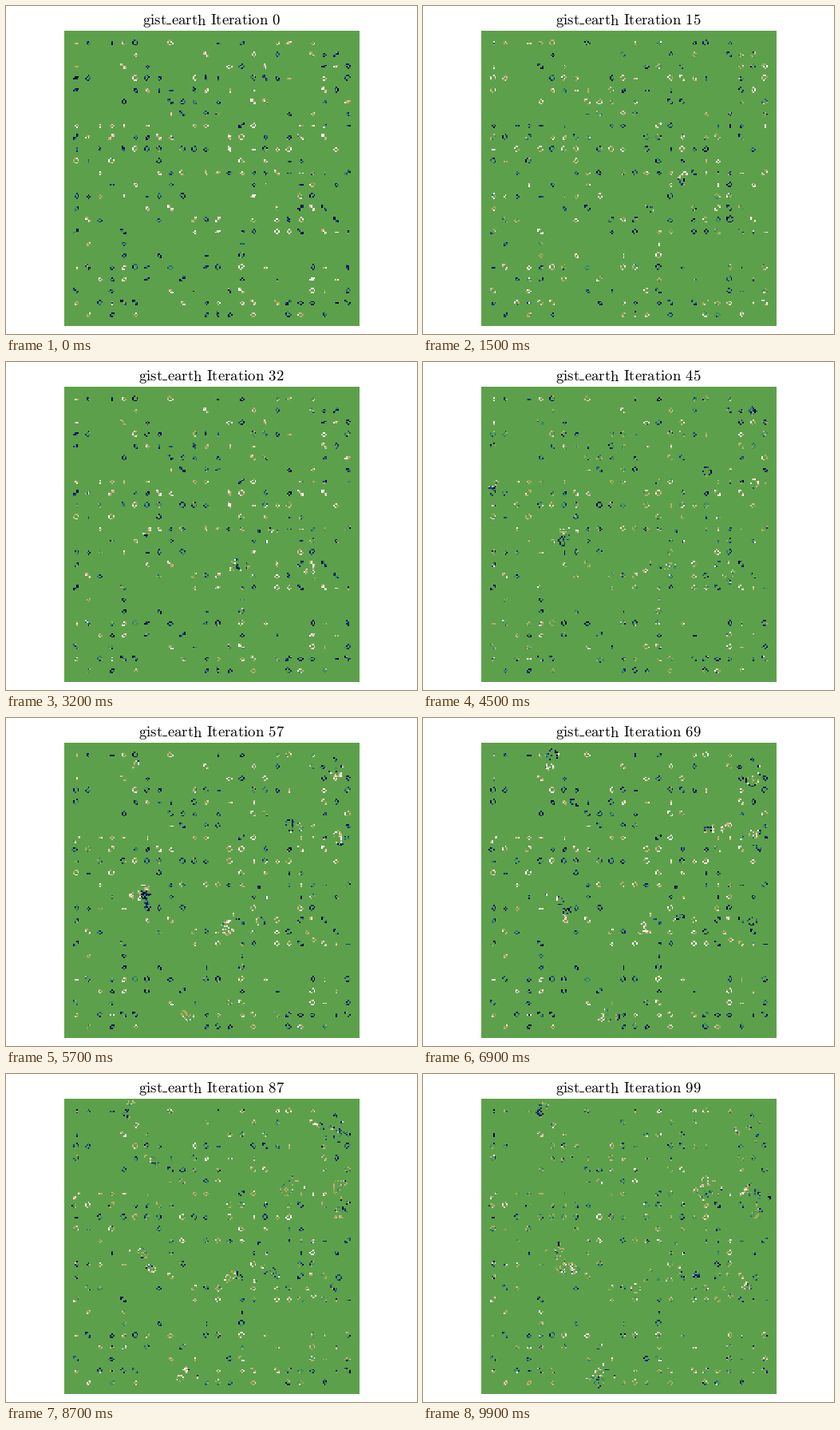
A matplotlib script that plays this animation: 515x411 px, repeating every 10000 ms.

```python
import numpy as np
import matplotlib.pyplot as plt
from matplotlib.animation import FuncAnimation
from matplotlib.patches import Rectangle
from matplotlib.transforms import IdentityTransform

plt.rcParams["mathtext.fontset"] = "cm"
plt.rcParams["text.hinting"] = "none"

W, H, DPI = 515, 411, 100
N, STEP = 200, 8           # cells per side, spacing of the seeds
BLOCKS = N // STEP
FRAMES = 100
EM = 18.8                  # title size in pixels

STILL = [".OO./O..O/.OO.", ".OO./O..O/O..O/.OO.", "OO./O.O/.O.",
         ".O./O.O/.O.", ".OO./O..O/.O.O/..O.", "OO./O.O/.OO"]
MOVING = ["OOO", ".OOO/OOO.", "OO../OO../..OO/..OO"]
R_PENTOMINO = ".OO/OO./.O."

# Where and when unstable growth sets in: column, row, iteration.
BURSTS = [(17, 12, 0), (14, 15, 4), (21, 16, 8), (7, 12, 20),
          (1, 8, 32), (23, 8, 36), (19, 7, 36), (23, 2, 38),
          (10, 23, 40), (6, 2, 46), (8, 5, 58), (23, 15, 60)]

rng = np.random.default_rng(12)


def stamp(grid, col, row, pattern):
    cells = np.array([[ch == "O" for ch in line] for line in pattern.split("/")])
    cells = np.rot90(cells, rng.integers(4))
    h, w = cells.shape
    y, x = row * STEP - h // 2, col * STEP - w // 2
    grid[y:y + h, x:x + w] = cells


def evolve(grid):
    near = sum(np.roll(grid, (dy, dx), (0, 1))
               for dy in (-1, 0, 1) for dx in (-1, 0, 1)) - grid
    return ((near == 3) | ((grid == 1) & (near == 2))).astype(int)


def seed_grid():
    """Scatter small stable patterns on a lattice, thinner near row 18."""
    grid = np.zeros((N, N), int)
    for row in range(1, BLOCKS):
        density = 0.44 * (1 - 0.65 * np.exp(-((row - 18) / 1.3) ** 2))
        for col in range(1, BLOCKS):
            if rng.random() < density:
                kind = STILL if rng.random() < 0.55 else MOVING
                stamp(grid, col, row, rng.choice(kind))
    return grid


def run():
    grid, history = seed_grid(), []
    for i in range(FRAMES):
        for col, row, begin in BURSTS:
            if i == begin:
                stamp(grid, col, row, R_PENTOMINO)
        history.append(grid)
        grid = evolve(grid)
    return history


def phase_field():
    """One light or dark phase per lattice point, blurred by cell noise."""
    phase = rng.choice([0, np.pi], (BLOCKS, BLOCKS))
    phase = phase + rng.normal(0, 0.5, phase.shape)
    field = np.kron(phase, np.ones((STEP, STEP)))
    field = np.roll(field, (-STEP // 2, -STEP // 2), (0, 1))
    return field + rng.normal(0, 0.6, field.shape)


history = run()
phase = phase_field()
gain = rng.uniform(0.3, 0.75, (N, N))


def colours(i):
    return np.clip(0.5 + history[i] * gain * np.cos(i + phase), 0.01, 1)


def title(i):
    gaps = (r"\hspace{0.41}", r"\hspace{0.38}", r"\hspace{0.38}", "")
    words = ("gist", "earth", "Iteration", i)
    return "$" + "".join(r"\mathrm{%s}%s" % pair for pair in zip(words, gaps)) + "$"


fig = plt.figure(figsize=(W / DPI, H / DPI), dpi=DPI, facecolor="white")
ax = fig.add_axes([73 / W, 10 / H, 370 / W, 370 / H])
ax.axis("off")
image = ax.imshow(colours(0), cmap="gist_earth", vmin=0, vmax=1,
                  interpolation="nearest", aspect="auto")
pixels = IdentityTransform()
label = fig.text(0, 388, "", transform=pixels, fontsize=EM * 72 / DPI,
                 ha="left", va="baseline")
rule = fig.add_artist(Rectangle((0, 388), 0.3 * EM, 1, color="black",
                                linewidth=0, transform=pixels))


def update(i):
    left = 175.3 - EM / 4 * len(str(i))
    image.set_data(colours(i))
    label.set_text(title(i))
    label.set_x(left)
    rule.set_x(left + 1.62 * EM)
    return image, label, rule


anim = FuncAnimation(fig, update, frames=FRAMES, interval=100,
                     repeat=True, repeat_delay=0, blit=False)
plt.show()
```
